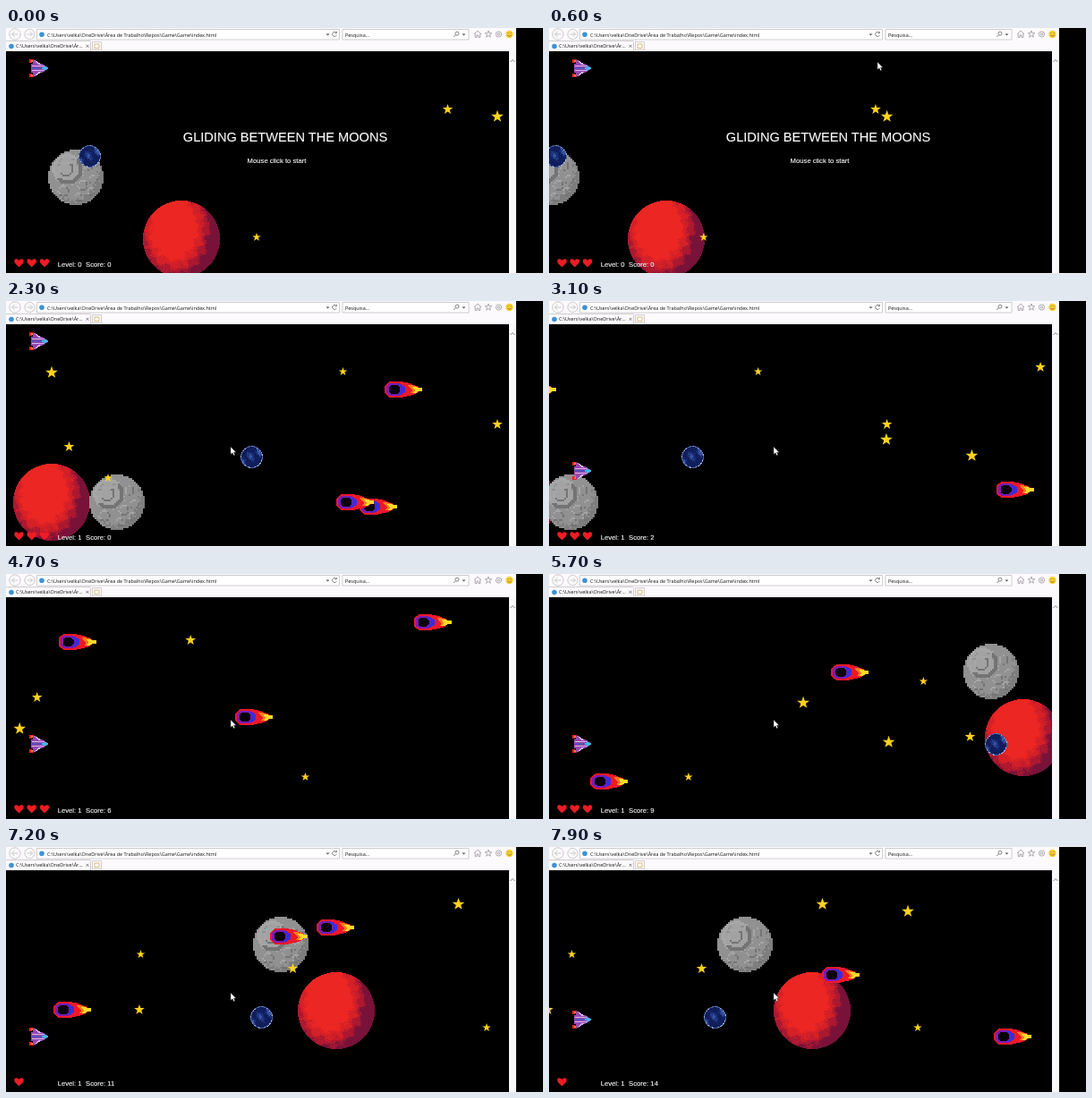
These frames come from a looping animation (600x274 px, 8 s). An HTML page:

```html
<!DOCTYPE html>
<html lang="pt">
<head>
<meta charset="utf-8">
<title>Game</title>
<style>
  html, body { margin: 0; width: 100%; height: 100%; overflow: hidden; background: #000; }
  svg { display: block; width: 600px; height: 274px; }
  .ui { font: 5.47px "Open Sans", "Noto Sans", sans-serif; fill: #111; }
  .game { font: 7.7px "Liberation Sans", Arial, sans-serif; fill: #fff; stroke: #fff; stroke-width: .12; white-space: pre; }
</style>
</head>
<body>
<svg id="stage" viewBox="0 0 600 274" xmlns="http://www.w3.org/2000/svg">
  <defs>
    <clipPath id="view"><path d="M0 26H562V274H0z"/></clipPath>
    <path id="heart" d="M0 4.8L-4.5 .3Q-6.2-2.6-4.2-4.2Q-1.6-5.2 0-2.5Q1.6-5.2 4.2-4.2Q6.2-2.6 4.5 .3z" fill="#ee1c24"/>
    <g id="meteor" shape-rendering="crispEdges">
      <path d="M-21-4L-19-6L-15-9H-3L2-8L7-7L11-5L15-4L17-2H21V2H17L15 4L11 6L6 7L2 8L-3 9H-15L-19 6L-21 4z" fill="#ee1827"/>
      <path d="M5-5H9L12-4L16-3V3L12 4H8L10 1L7-2z" fill="#ff7a18"/>
      <path d="M10-3H14L17-2H21V2H17L14 4H10L13 1z" fill="#ffd92a"/>
      <path d="M-19-4L-15-7H-5L0-3V3L-5 7H-15L-19 4z" fill="#7a1cb4"/>
      <path d="M-6-6H-3L2-3V3L-3 6H-6L-3 2V-2z" fill="#3a2ce0"/>
      <path d="M-16-3L-13-5H-7L-4-2V2L-7 5H-13L-16 3z" fill="#060008"/>
    </g>
    <g id="ship" shape-rendering="crispEdges">
      <path d="M-11-10H-6V-7H-8V-6H-11zM-11 10H-6V7H-8V6H-11z" fill="#ee2029"/>
      <path d="M-9-9H-6V-7H-9zM-9 9H-6V7H-9z" fill="#ff7a20"/>
      <path d="M-7-9H-4L2-5L6-4L11 0L6 4L2 5L-4 9H-7L-6 5H-9V-5H-6z" fill="#9448b0"/>
      <path d="M-5-9H-4L2-5V-4H0zM-5 9H-4L2 5V4H0zM-8-3H5V-2H-8zM-8 2H5V3H-8z" fill="#d9b4e6"/>
      <path d="M-8-1H3V1H-8z" fill="#5a50b8"/>
      <path d="M5-3L11 0L5 3V1H3V-1H5z" fill="#46b6e6"/>
    </g>
  </defs>

  <path d="M0 0H570V26H0z" fill="#fcfafc"/>
  <path d="M94.5 26V15.5M0 14.5H94.5M96.5 15.5H106.5V24.5H96.5z" fill="none" stroke="#c4c2c4" stroke-width=".8"/>
  <path d="M34.5 1.5H372.5V13H34.5zM376 1.5H517V13H376z" fill="#fff" stroke="#c2c0c2" stroke-width=".8"/>
  <g fill="#fafafa" stroke="#c4c2c4" stroke-width=".9">
    <circle cx="10" cy="7" r="6.2"/><circle cx="26.5" cy="7" r="5.6"/>
    <path d="M13.5 7H6.5M9.5 4L6.5 7L9.5 10M23.5 7H29.5M27 4.5L29.5 7L27 9.5" fill="none"/>
  </g>
  <circle cx="40" cy="7.3" r="2.8" fill="#3d92d6"/>
  <circle cx="6" cy="20.5" r="2.8" fill="#3d92d6"/>
  <path d="M99 18H104V22.5H99z" fill="#fff" stroke="#c9a04a" stroke-width=".7"/>
  <text class="ui" x="46" y="9.5">C:\Users\velka\OneDrive\Área de Trabalho\Repos\Game\Game\index.html</text>
  <text class="ui" x="11" y="22.3">C:\Users\velka\OneDrive\Ár...</text>
  <text class="ui" x="379" y="9.5">Pesquisa...</text>
  <path d="M357.5 6.5H361.5L359.5 8.5zM509.5 6.5H513.5L511.5 8.5z" fill="#555"/>
  <g fill="none" stroke="#666" stroke-width=".8">
    <path d="M369 5.3A2.5 2.5 0 1 0 369.4 8M369.4 3.8V5.8H367.4M89.5 18.8L92.5 21.8M92.5 18.8L89.5 21.8"/>
    <circle cx="504" cy="6.2" r="2"/><path d="M502.5 7.7L500.3 10"/>
  </g>
  <g fill="none" stroke="#9b999b" stroke-width=".8">
    <path d="M523 7L527 3L531 7M524.2 6.2V10.5H526V8H528V10.5H529.8V6.2"/>
    <path id="favorite"/>
    <circle cx="550.5" cy="7" r="3.1"/><circle cx="550.5" cy="7" r="1.2"/>
  </g>
  <circle cx="562.5" cy="7" r="4.2" fill="#f8cf32"/>
  <path d="M560.2 8Q562.5 10.6 564.8 8M561 5V6M564 5V6" fill="none" stroke="#7a5a10" stroke-width=".7"/>
  <path d="M562 26H570V274H562z" fill="#fbf8fb"/>
  <path d="M563.5 38L566 35.5L568.5 38" fill="none" stroke="#777" stroke-width=".9"/>

  <g clip-path="url(#view)">
    <g id="intro" class="game" text-anchor="middle">
      <text x="312" y="127" style="font-size:14.6px">GLIDING BETWEEN THE MOONS</text>
      <text x="302.5" y="151.3">Mouse click to start</text>
    </g>
    <g id="movers"></g>
    <use id="player" href="#ship"/>
    <g id="lives">
      <use href="#heart" x="14.5" y="262.6"/><use href="#heart" x="28.7" y="262.6"/><use href="#heart" x="43" y="262.6"/>
    </g>
    <text id="level" class="game" x="57.7" y="266.8"></text>
    <text id="score" class="game" x="89" y="266.8"></text>
  </g>
  <path id="cursor" d="M0 0V8.5L2 6.8L3.4 9.7L4.8 9L3.5 6.2H6z" fill="#fff" stroke="#222" stroke-width=".4"/>
</svg>
<script>
const NS = "http://www.w3.org/2000/svg";
const LOOP = 8000, RELOAD = 1000, START = 1800, UNIT = 0.0357143;
const $ = id => document.getElementById(id);

function node(name, attrs, parent) {
  const el = document.createElementNS(NS, name);
  for (const key in attrs) el.setAttribute(key, attrs[key]);
  return parent.appendChild(el);
}

function randomizer(seed) {
  return () => (seed = (seed * 16807) % 2147483647) / 2147483647;
}

// Pixelated disc: one path per colour; shade(nx, ny, noise) picks the colour.
function pixelBall(id, radius, step, shade) {
  const random = randomizer(radius * 77 + 5), paths = {};
  for (let y = -radius; y < radius; y += step)
    for (let x = -radius; x < radius; x += step) {
      const nx = (x + step / 2) / radius, ny = (y + step / 2) / radius;
      if (Math.hypot(nx, ny) > 1) continue;
      const color = shade(nx, ny, random());
      paths[color] = (paths[color] || "") + `M${x} ${y}h${step}v${step}h${-step}z`;
    }
  const group = node("g", { id, "shape-rendering": "crispEdges" }, document.querySelector("defs"));
  for (const color in paths) node("path", { d: paths[color], fill: color }, group);
}

function starPath(cx, cy, r) {
  let d = "";
  for (let i = 0; i < 10; i++) {
    const a = i * Math.PI / 5, k = i % 2 ? r * 0.4 : r;
    d += `${i ? "L" : "M"}${(cx + k * Math.sin(a)).toFixed(2)} ${(cy - k * Math.cos(a)).toFixed(2)}`;
  }
  return d + "z";
}

pixelBall("red", 43, 1, (x, y, n) => {
  const clumps = Math.sin(x * 13 + y * 9) * Math.sin(y * 17 - x * 7) * 0.07;
  const depth = Math.hypot((x + 0.2) * 1.2, (y + 0.27) * 0.9) + clumps + (n - 0.5) * 0.12;
  return depth < 0.74 ? "#ec2622" : depth < 0.92 ? "#d42027" : depth < 1.08 ? "#ab1830" : "#781238";
});

const craters = [[-0.3, -0.3, 0.5], [-0.35, -0.3, 0.25], [0.45, -0.42, 0.15], [0.62, 0.08, 0.15],
  [0.25, 0.3, 0.17], [-0.45, 0.5, 0.18], [0.1, 0.72, 0.14], [0.55, 0.52, 0.13]];
pixelBall("moon", 31, 2, (x, y, n) => {
  for (const [cx, cy, r] of craters) {
    const d = Math.hypot(x - cx, y - cy) / r;
    if (d > 0.84 && d < 1.1) return x - cx + y - cy > 0 ? "#747474" : "#a6a6a6";
  }
  const light = 0.62 - Math.hypot(x + 0.25, y + 0.25) * 0.4 + (n - 0.5) * 0.1;
  return light > 0.44 ? "#a2a2a2" : light > 0.18 ? "#919191" : "#7e7e7e";
});

pixelBall("earth", 12.5, 1, (x, y, n) => {
  if (Math.hypot(x, y) > 0.91) return n > 0.6 ? "#a3b1d4" : "#4a5f9c";
  const land = Math.sin(x * 4 + 2) * Math.cos(y * 4 - x * 2) + (n - 0.5) * 0.6;
  return land > 0.7 ? "#3a55a2" : land > 0.2 ? "#1b327c" : "#101e5c";
});

const starSizes = { small: 5, mid: 6.1, big: 7.2 };
for (const id in starSizes)
  node("path", { id, d: starPath(0, 0, starSizes[id]), fill: "#ffd21c" }, document.querySelector("defs"));
$("favorite").setAttribute("d", starPath(539, 7, 4));

// speed in units, wrap period, and x of the left exit
const kinds = {
  red: { speed: 3, period: 843, exit: -44 },
  moon: { speed: 3.5, period: 795, exit: -32 },
  earth: { speed: 4, period: 711, exit: -13 },
  small: { speed: 5, period: 649, exit: -11 },
  mid: { speed: 6, period: 650, exit: -11 },
  big: { speed: 8, period: 650, exit: -11 },
  meteor: { speed: 16, period: 702, exit: -22 }
};
const HIT_SKIP = 84;

// Each mover: kind, x at the scene's clock, y for every pass, extra options.
const scenes = [
  { from: 0, to: RELOAD, clock: 0, movers: [
    ["red", 195.5, [235.5]], ["moon", 78, [167]], ["earth", 93, [143]],
    ["mid", 493.5, [91]], ["small", 280, [234]], ["big", 549, [99]]
  ] },
  { from: RELOAD, to: START, clock: 1200, movers: [
    ["red", 335.5, [96]], ["moon", 525, [238]], ["earth", 286.5, [224]],
    ["small", 106, [199]], ["small", 321, [231]],
    ["mid", 380, [83]], ["mid", 254, [109]], ["big", 409.5, [65]]
  ] },
  { from: START, to: LOOP, clock: 2300, movers: [
    ["red", 51, [225, 183]], ["moon", 124, [225, 109]], ["earth", 274.5, [174.5, 190]],
    ["meteor", 444, [99, 130, 54, 198, 90, 120], { speed: 16, hit: 6643 }],
    ["meteor", 416, [230, 70, 160, 110, 182, 143], { speed: 18 }],
    ["meteor", 390, [225, 211, 76, 232, 175, 100, 212], { speed: 20, hit: 6686 }],
    ["small", 376.5, [79, 120]], ["small", 114, [198, 227, 202]],
    ["mid", 549, [138, 182, 100]], ["mid", 70.5, [163, 74, 136]],
    ["big", 51, [80, 173, 188, 72]], ["big", 605.5, [155, 144, 64]]
  ] }
];

for (const scene of scenes) {
  scene.group = node("g", {}, $("movers"));
  scene.movers = scene.movers.map(([kind, x, ys, options]) => ({
    ...kinds[kind], ...options, kind, x, ys,
    el: node("use", { href: "#" + kind }, scene.group)
  }));
}

// Piecewise linear value from [time, value] keys.
function along(keys, t) {
  if (t <= keys[0][0]) return keys[0][1];
  for (let i = 1; i < keys.length; i++) {
    const [t0, a] = keys[i - 1], [t1, b] = keys[i];
    if (t <= t1) return a + (b - a) * (t - t0) / (t1 - t0);
  }
  return keys[keys.length - 1][1];
}

const shipY = [[2350, 45], [3030, 190], [5900, 190], [5930, 196], [6520, 196], [6570, 189],
  [6750, 189], [6860, 212], [7380, 212], [7470, 193]];
const cursorX = [[900, 367], [1300, 367], [1650, 251]];
const cursorY = [[500, 60], [750, 5], [1000, 15], [1200, 97], [1300, 97], [1650, 163]];

function place(el, x, y) {
  el.setAttribute("transform", `translate(${x.toFixed(2)} ${y.toFixed(2)})`);
}

function show(el, visible) {
  el.setAttribute("visibility", visible ? "visible" : "hidden");
}

function render(t) {
  let score = 0, hits = 0;
  for (const scene of scenes) {
    const active = t >= scene.from && t < scene.to;
    scene.group.style.display = active ? "" : "none";
    if (!active) continue;
    for (const m of scene.movers) {
      const hit = t >= m.hit;
      const x = m.x - m.speed * UNIT * (t - scene.clock) - (hit ? HIT_SKIP : 0);
      const pass = Math.max(0, Math.ceil((m.exit - x) / m.period));
      place(m.el, x + pass * m.period, m.ys[Math.min(pass, m.ys.length - 1)]);
      if (m.kind === "meteor") {
        score += pass - hit;
        hits += hit;
      }
    }
  }
  const playing = t >= START;
  show($("intro"), !playing);
  show($("cursor"), t >= 500);
  place($("cursor"), along(cursorX, t), along(cursorY, t));
  place($("player"), 36.5, along(shipY, t));
  [...$("lives").children].forEach((heart, i) => show(heart, i < 3 - hits));
  $("level").textContent = "Level: " + (playing ? 1 : 0);
  $("score").textContent = "Score: " + score;
}

const began = performance.now();
function tick() {
  const t = (performance.now() - began) % LOOP;
  render(Math.floor(t / 100) * 100);
  requestAnimationFrame(tick);
}
render(0);
requestAnimationFrame(tick);
</script>
</body>
</html>
```
